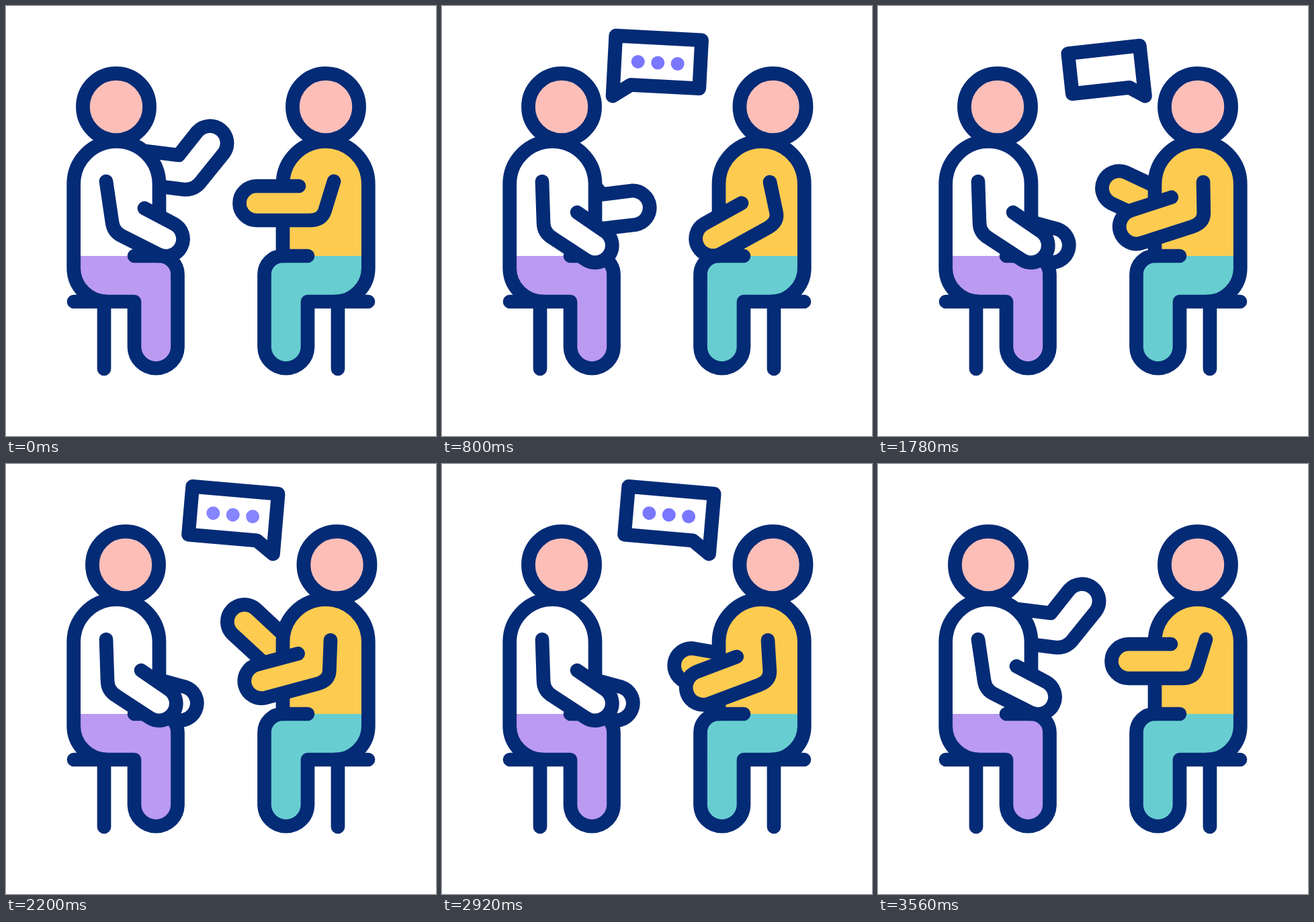
These frames come from a looping animation (640 px wide and 640 px high, 3.6 s). An HTML page:

```html
<!DOCTYPE html>
<html lang="en">
<head>
<meta charset="utf-8">
<title>Conversation</title>
<style>
  html, body { margin: 0; width: 100%; height: 100%; overflow: hidden; background: #fff; }
  svg { display: block; width: 100%; height: 100%; }
  .line { fill: none; stroke: #042b76; stroke-width: 20.7; stroke-linecap: round; stroke-linejoin: round; }
  .skin { fill: #fdbeb8; }
  .white { fill: #fff; }
  .yellow { fill: #fdcb50; }
  .dots { fill: #7a77ff; }
  #balloon { vector-effect: non-scaling-stroke; }
</style>
</head>
<body>
<svg viewBox="0 0 640 640">
  <defs>
    <path id="shirt" d="M101 373V265A63.5 63.5 0 0 1 228 265V373Z"/>
    <path id="pants" d="M101 372H228A27.5 27.5 0 0 1 255.5 399.5V507A32.25 32.25 0 0 1 191 507V440H151A50 50 0 0 1 101 390Z"/>
    <g id="outline" class="line">
      <path d="M228 372V265A63.6 63.6 0 0 0 100.7 265V390A50 50 0 0 0 151 440"/>
      <path d="M191 372H228A27.5 27.5 0 0 1 255.5 399.5V507A32.25 32.25 0 0 1 191 507V440H101M146 440V540"/>
    </g>
    <path id="balloon" class="line white" d="M0 0V-90H128V-18H26Z"/>
    <g id="ellipsis" class="dots">
      <circle cx="35" cy="-53" r="10"/><circle cx="64.5" cy="-53" r="10"/><circle cx="94" cy="-53" r="10"/>
    </g>
  </defs>

  <path id="backArmL" class="line white" d="M208 216L257 222L284.7 187A25.5 25.5 0 0 1 324.3 219L292 259Q281 275 264 273L232 269"/>
  <use href="#shirt" fill="#fff"/>
  <use href="#pants" fill="#bb9af1"/>
  <use href="#outline"/>
  <path id="armL" class="line white" d="M149 261L158 322Q160 337 174 343L227.5 370A25.5 25.5 0 0 0 249.5 324L206 301"/>
  <circle id="headL" class="line skin" cx="164" cy="150" r="49.6"/>

  <path id="backArmR" class="line yellow" d="M430 270L371.4 215.4A25.5 25.5 0 0 0 336.6 252.6L388 300Q400 311 430 300"/>
  <g transform="translate(640) scale(-1 1)">
    <use href="#shirt" fill="#fdcb50"/>
    <use href="#pants" fill="#68cdd1"/>
    <use href="#outline"/>
  </g>
  <path id="armR" class="line yellow" d="M488 261L474.5 305Q470 319 452 319H373A25.5 25.5 0 0 1 373 268H436"/>
  <circle id="headR" class="line skin" cx="476" cy="150" r="49.6"/>

  <g id="bubbleL"><use href="#balloon"/><use id="dotsL" href="#ellipsis"/></g>
  <g id="bubbleR"><use href="#balloon"/><use id="dotsR" href="#ellipsis"/></g>
</svg>
<script>
const LOOP = 3600;
const set = (id, name, value) => document.getElementById(id).setAttribute(name, value);

// Eased rise from 0 to 1 between two times.
function ramp(t, from, to) {
  const x = Math.min(1, Math.max(0, (t - from) / (to - from)));
  return x * x * (3 - 2 * x);
}

function pose(id, { angle = 0, x = 0, y = 0, dx = 0, dy = 0 }) {
  set(id, "transform", `translate(${dx} ${dy}) rotate(${angle} ${x} ${y})`);
}

// Pops out of its tail, rocks around it, shows the dots, then shrinks back.
function bubble(t, side, { x, mirror, start, end, peak, period }) {
  const scale = ramp(t, start, start + 270) - ramp(t, end, end + 220);
  const angle = 12 * (1 - scale) - 4.9 * Math.cos(2 * Math.PI * (t - peak) / period);
  set("bubble" + side, "transform",
    `translate(${x} 134) scale(${mirror * scale} ${scale}) rotate(${angle})`);
  set("dots" + side, "opacity", ramp(t, start + 460, start + 660));
}

function draw(t) {
  const home = ramp(t, 3120, 3540);
  const lean = ramp(t, 0, 540) - home;
  const lower = ramp(t, 0, 460) - home;
  const rest = ramp(t, 1140, 1480) - home;
  const speak = ramp(t, 1360, 1960) - ramp(t, 2740, 3160);
  const nod = ramp(t, 1380, 1770) - ramp(t, 1770, 2180);

  pose("headL", { dx: 14 * lean });
  pose("armL", { angle: 6.5 * lower, x: 149, y: 261 });
  pose("backArmL", {
    angle: 44.5 * ramp(t, 0, 540) + 22.5 * ramp(t, 980, 1220) - 67 * home,
    x: 176, y: 228, dx: 11 * rest, dy: 20 * rest
  });

  pose("headR", { dx: 16.5 * (lean - nod) });
  pose("armR", { angle: 14 * speak - 29 * lower, x: 488, y: 261, dx: -5 * speak, dy: lower });
  pose("backArmR", { angle: 83 * (speak - 1), x: 473, y: 240 });

  bubble(t, "L", { x: 254, mirror: 1, start: 120, end: 1380, peak: 460, period: 960 });
  bubble(t, "R", { x: 397.5, mirror: -1, start: 1580, end: 3200, peak: 2200, period: 720 });
}

function frame() {
  draw(performance.now() % LOOP);
  requestAnimationFrame(frame);
}
frame();
</script>
</body>
</html>
```
